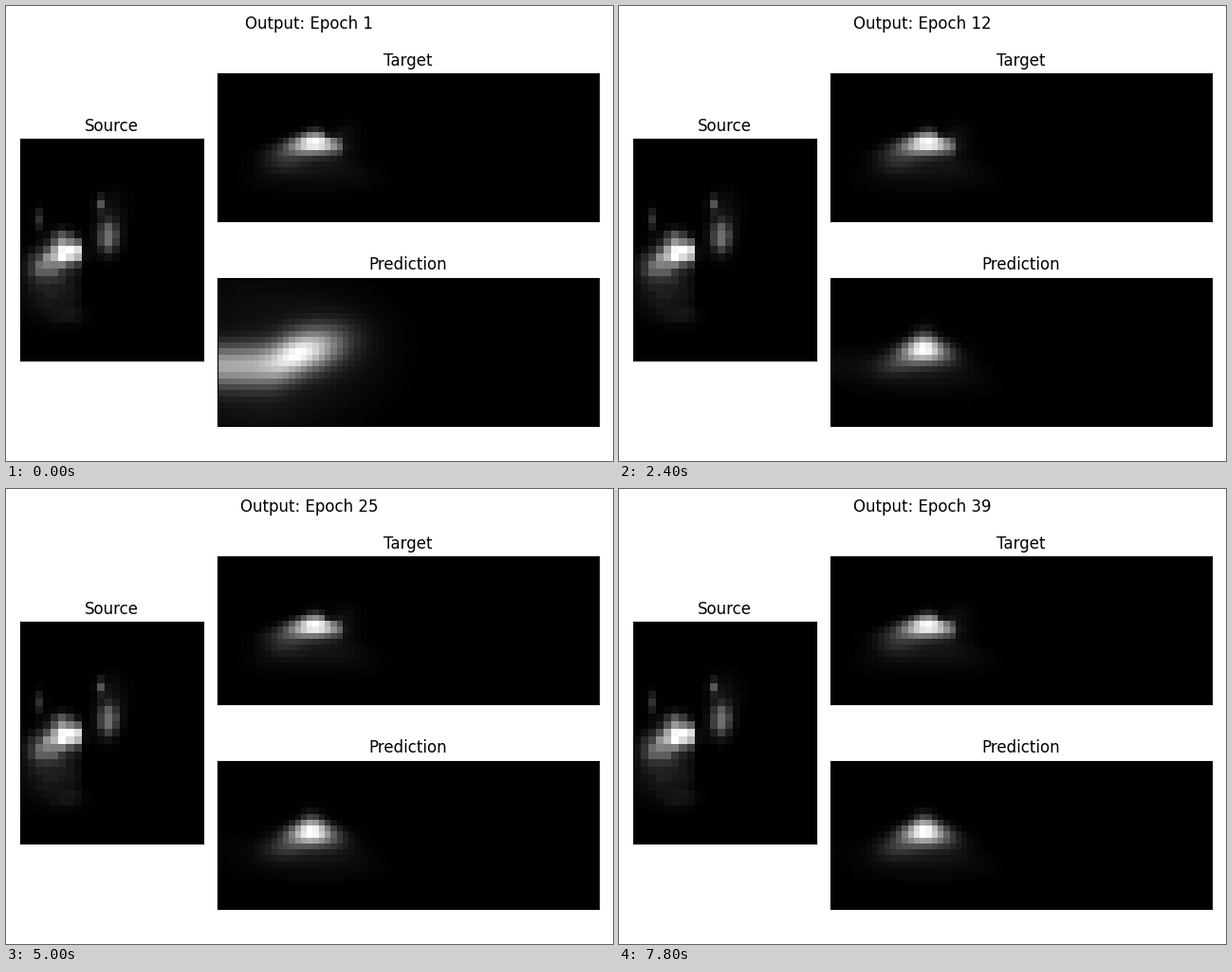
A matplotlib script that plays this animation: 640 by 480 pixels, repeating every 8000 ms.

```python
import numpy as np
import matplotlib.pyplot as plt
from matplotlib.animation import FuncAnimation

W, H = 640, 480
FRAMES, STEP = 40, 200


def grid(rows, cols):
    r, c = np.mgrid[0:rows, 0:cols]
    return r.astype(float), c.astype(float)


def hill(r, c, r0, c0, sr, sc):
    return np.exp(-((r - r0) / sr) ** 2 / 2 - ((c - c0) / sc) ** 2 / 2)


def scaled(z):
    return np.clip(z / z.max(), 0, 1)


def skirt(r, c):
    """Faint cone widening downwards, with a brighter left shoulder."""
    half = 6 + 1.05 * np.clip(r - 13, 0, None)
    cone = np.exp(-((r - 15) / 2.4) ** 2 / 2 - np.abs((c - 15.4) / half) ** 3)
    return .08 * cone + .11 * hill(r, c, 14.5, 10.5, 1.1, 2.4)


def source_map():
    r, c = grid(29, 24)
    rng = np.random.default_rng(4)
    z = 1.13 * hill(r, c, 14.35, 5.9, .95, 1.7)
    z += .43 * hill(r, c, 16.1, 3, 1.1, 1.5)
    z += .3 * hill(r, c, 12.3, 5, .7, .9)
    z += .13 * hill(r, c, 18.8, 3.6, 2.6, 2.6)
    z[:, 8:] *= .1
    z += .48 * hill(r, c, 12.3, 11, 1.4, .9)
    z += .28 * hill(r, c, 8, 10, .6, .45)
    z += .2 * hill(r, c, 10, 2, .9, .45)
    z += .05 * hill(r, c, 9, 11.5, 2, 1.5) + .06 * hill(r, c, 22.5, 6, .8, 1.5)
    return np.clip(z * rng.uniform(.88, 1.12, z.shape), 0, 1)


def target_map():
    r, c = grid(25, 64)
    mid = 15.8 - .7 * np.clip(r - 12, 0, 2)
    wide = np.clip(1.5 + .7 * (r - 9.5), 1, 4)
    z = np.exp(-((r - 11.35) / 1.22) ** 2 / 2 - ((c - mid) / wide) ** 2 / 2)
    z[:, 21:] *= .25
    z[9:11, 18:20] *= .35
    z += skirt(r, c) + .05 * hill(r, c, 9.5, 21, 1.3, 1.6)
    return scaled(z)


def prediction_map(epoch):
    r, c = grid(25, 64)
    t = 1 / epoch                       # error left, shrinking with training

    def settle(start, end, power=1):
        return end + (start - end) * t ** power

    # Main spot: broad and tilted at first, then compact and flared.
    dc = c - settle(13.8, 15.3)
    dr = r - settle(12.1, 11.3, .5) + settle(.22, 0) * dc
    width = np.where(dc < 0, settle(3.2, 2.4), settle(4.4, 2.4, 1.7))
    width = width * np.clip(1 + settle(0, .22, .6) * dr, .5, 2)
    z = np.exp(-(dc / width) ** 2 / 2 - (dr / settle(2.4, 1.4, .7)) ** 2 / 2)

    # Streak from the left edge, bending up into the spot.
    ridge = 14.4 - 2 / (1 + np.exp((13 - c) / 1.5))
    fade = 1 / (1 + np.exp((c - 11.3) / 1.5))
    z += .8 * t ** 1.15 * fade * np.exp(-((r - ridge) / settle(2.5, 1.7, .7)) ** 2 / 2)

    z += .13 * t * hill(r, c, 11.5, 17, 5, 7)
    z += .09 * t ** 2 * (hill(r, c, 21, 6, 4, 9) + .6 * hill(r, c, 5, 4, 6, 10))
    z += settle(0, 1.1, .6) * skirt(r, c)
    return scaled(z)


fig = plt.figure(figsize=(W / 100, H / 100), dpi=100)
heading = fig.suptitle("Output: Epoch 1")


def panel(title, z, x, y, w, h):
    ax = fig.add_axes([x / W, 1 - (y + h) / H, w / W, h / H])
    ax.set_title(title)
    ax.set_xticks([])
    ax.set_yticks([])
    return ax.imshow(z, cmap="gray", vmin=0, vmax=1, aspect="auto",
                     interpolation="nearest")


panel("Source", source_map(), 15, 140.4, 193.33, 233.6)
panel("Target", target_map(), 223.33, 71, 401.67, 156.4)
view = panel("Prediction", prediction_map(1), 223.33, 286.6, 401.67, 156.4)


def update(i):
    epoch = max(1, i)
    heading.set_text(f"Output: Epoch {epoch}")
    view.set_data(prediction_map(epoch))
    return heading, view


anim = FuncAnimation(fig, update, frames=FRAMES, interval=STEP,
                     repeat=True, repeat_delay=0)
plt.show()
```
